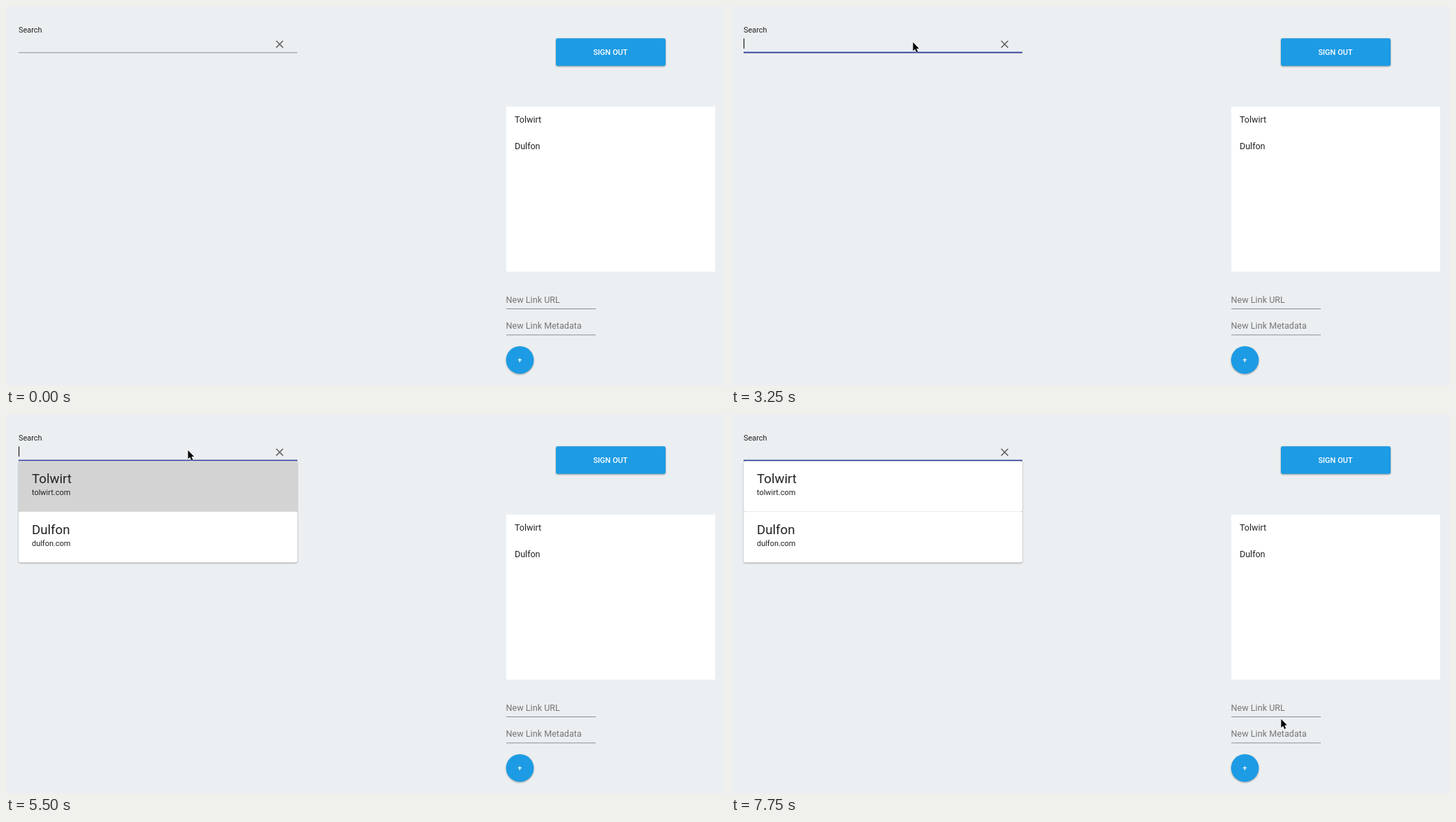
An HTML page for the animation above (8000 ms loop, 1029 px wide and 544 px high).

```html
<!DOCTYPE html>
<html lang="en">
<head>
<meta charset="utf-8">
<title>Link search</title>
<style>
  html, body { margin: 0; width: 100%; height: 100%; overflow: hidden; background: #ebeff1; }
  svg { display: block; font: 12.5px Roboto, sans-serif; fill: #212121; }
  .small { font-size: 10.95px; }
  .title { font-size: 18.7px; }
  .hint { fill: #757575; letter-spacing: .06px; }
  .rule { fill: #8d8f91; }
  .blue { fill: #1d9be4; }
  .label { fill: #fff; font-size: 11px; font-weight: 500; text-anchor: middle; }
  .raised { filter: drop-shadow(0 1.5px 1.2px rgba(0,0,0,.36)); }
  .card { filter: drop-shadow(0 1px .8px rgba(0,0,0,.34)); }
</style>
</head>
<body>
<svg width="1029" height="544" viewBox="0 0 1029 544">
  <rect width="1029" height="544" fill="#ebeff1"/>

  <text class="small" x="18" y="37.5">Search</text>
  <rect class="rule" x="18" y="66.3" width="399" height="1"/>
  <rect id="focus" x="18" y="65.6" width="399" height="1.8" fill="#303f9f"/>
  <rect id="mark" x="18" y="46" height="15" fill="#a9cef4"/>
  <text id="query" x="18" y="58"></text>
  <rect id="caret" y="46.5" width="1.1" height="14.5" fill="#111"/>
  <path d="M386.7 49.8l9.8 9.8m0-9.8l-9.8 9.8" fill="none" stroke="#616161" stroke-width="1.5"/>

  <g id="menu">
    <g class="card">
      <rect x="18" y="67.6" width="399" height="72.2" rx="2.4" fill="#fff"/>
      <rect x="18" y="139.8" width="399" height="72.7" rx="2.4" fill="#fff"/>
    </g>
    <path d="M20 139.7H415" stroke="#e9e9e9" stroke-width=".8"/>
    <rect id="picked" x="18" y="67.6" width="399" height="72.1" fill="#d3d3d3"/>
    <text class="title" x="37" y="99">Tolwirt</text>
    <text class="small" x="37" y="116.4">tolwirt.com</text>
    <text class="title" x="37" y="171.7">Dulfon</text>
    <text class="small" x="37" y="189.1">dulfon.com</text>
  </g>

  <rect class="blue raised" x="787" y="46.3" width="157" height="39.4" rx="2.4"/>
  <text class="label" x="865" y="70">SIGN OUT</text>

  <rect x="716" y="144" width="299" height="236.3" fill="#fff"/>
  <rect id="hover" x="716" y="144" width="299" height="37.7" fill="#eee"/>
  <text x="728" y="167.2">Tolwirt</text>
  <text x="728" y="204.8">Dulfon</text>

  <text class="hint" x="715.5" y="425">New Link URL</text>
  <rect class="rule" x="716" y="433" width="128" height="1"/>
  <text class="hint" x="715.5" y="462.4">New Link Metadata</text>
  <rect class="rule" x="716" y="470.4" width="128" height="1"/>
  <circle class="blue raised" cx="735.5" cy="506.8" r="19.8"/>
  <text class="label" x="735.3" y="510.7">+</text>

  <path id="pointer" d="M0 0V12.2L2.8 9.7L4.8 14.3L6.9 13.4L5 8.9H8.6Z"
        fill="#000" stroke="#fff" stroke-width=".9" paint-order="stroke"/>
</svg>
<script>
  const LOOP = 8000;
  const el = id => document.getElementById(id);
  const [focus, mark, query, caret, menu, picked, hover, pointer] =
    ['focus', 'mark', 'query', 'caret', 'menu', 'picked', 'hover', 'pointer'].map(el);

  const within = (t, a, b) => t >= a && t < b;
  const show = (node, on) => node.setAttribute('visibility', on ? 'visible' : 'hidden');

  // Last entry whose start time has passed.
  const at = (track, t) => track.filter(k => k[0] <= t).pop();

  const moves = [
    [0, -50, -50], [750, 730.5, 143.5], [1000, 721.5, 138.5], [1500, 764.5, 177.5],
    [2000, 763.5, 171.5], [2750, 484.5, 163.7], [3000, 260.5, 52],
    [6500, 664.8, 285.2], [7500, 952.5, 453.5], [7750, 787.3, 436.7]
  ];
  const texts = [
    [0, ''], [3500, 'http://console.firebase.google.com/'], [4500, ''],
    [6000, 'Tolwirt'], [7250, '']
  ];
  // The caret restarts its blink after each edit.
  const edits = [[3250], [3500], [4500], [6000], [7250]];

  function draw(t) {
    const [, x, y] = at(moves, t);
    pointer.setAttribute('transform', `translate(${x} ${y})`);

    const text = at(texts, t)[1];
    if (query.textContent !== text) query.textContent = text;
    const width = text ? query.getComputedTextLength() : 0;

    const selected = within(t, 4250, 4500) || within(t, 6750, 7250);
    mark.setAttribute('width', width);
    show(mark, selected);

    const edit = at(edits, t);
    caret.setAttribute('x', 18 + width);
    show(caret, edit && !selected && (t - edit[0]) % 1000 < 500);

    focus.setAttribute('opacity', t < 3000 ? 0 : t < 3250 ? .55 : 1);
    show(hover, within(t, 1500, 3000));
    show(menu, within(t, 4500, 6000) || t >= 7250);
    show(picked, within(t, 5500, 6000));
  }

  function tick() {
    draw(performance.now() % LOOP);
    requestAnimationFrame(tick);
  }
  tick();
</script>
</body>
</html>
```
